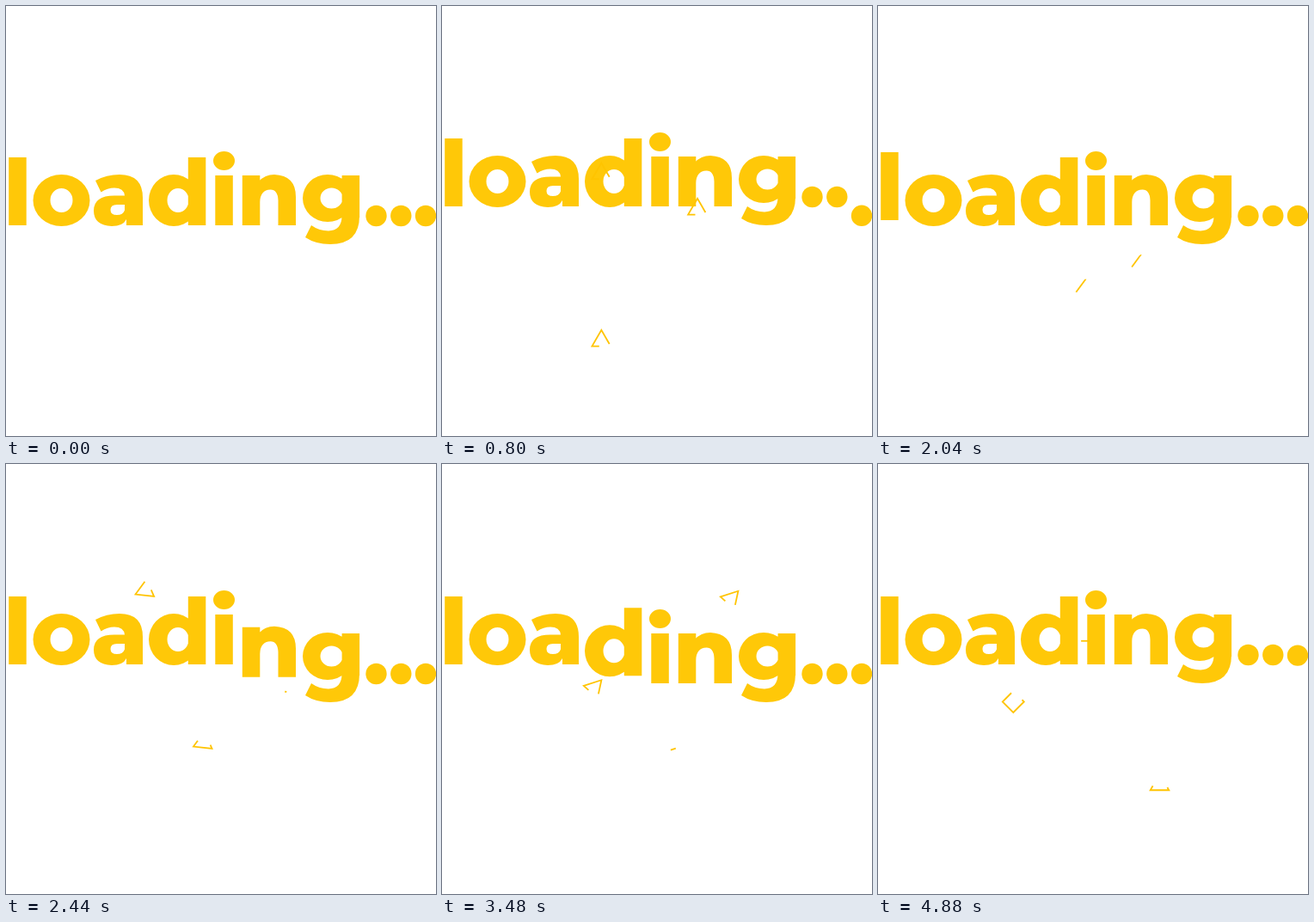
These frames come from a looping animation (500 by 500 pixels, 4.92 s). An HTML page:

```html
<!DOCTYPE html>
<html lang="en">
<head>
<meta charset="utf-8">
<title>loading...</title>
<style>
  html, body { margin: 0; width: 100%; height: 100%; overflow: hidden; background: #fff; }
  svg { display: block; width: 100%; height: 100%; }
  #word { fill: #ffc808; }
  #sparks { fill: none; stroke: #ffc400; stroke-width: 1.8; }
</style>
</head>
<body>
<svg viewBox="0 0 500 500" role="img" aria-label="loading...">
  <g id="word"></g>
  <g id="sparks"></g>
</svg>
<script>
const LOOP = 4920;
const SWEEP = 960, DELAY = 18, LIFT = 22, STEEP = 1.25;
const LIFE = 640, RADIUS = 12.5, TURNS = 2, TURN_TIME = 4800;

const clamp = v => Math.min(1, Math.max(0, v));
const smooth = v => v * v * (3 - 2 * v);

function add(parent, tag, attrs) {
  const el = document.createElementNS('http://www.w3.org/2000/svg', tag);
  for (const k in attrs) el.setAttribute(k, attrs[k]);
  return document.getElementById(parent).appendChild(el);
}

// Glyph parts: solid shapes run clockwise, holes the other way
const BASE = 255, STEM = 20.5;
const stem = (x, top, bottom = BASE) => `M${x},${top}h${STEM}V${bottom}h${-STEM}Z`;
const oval = (x, y, rx, ry, sweep = 1) =>
  `M${x - rx},${y}a${rx},${ry} 0 1 ${sweep} ${2 * rx},0a${rx},${ry} 0 1 ${sweep} ${-2 * rx},0Z`;
const hole = (x, y, rx, ry) => oval(x, y, rx, ry, 0);
const dot = x => oval(x, 244, 12.2, 12.2);

const letters = [
  stem(3.2, 176),
  oval(64.5, 226, 33, 30) + hole(64.5, 226, 13, 14),
  'M104,203Q117,196 132,196Q159,196 159,223V255H140V248Q136,256 123,256Q102,255 102,238' +
    'Q102,220.5 126,220.5H138Q137,211.5 126,211.5Q118,211.5 110.5,216.5Z' +
    'M138,231H129Q121.5,231 121.5,237Q121.5,243 129,243Q136,243 138,237.5Z',
  oval(195, 226, 29, 30) + hole(200, 226, 12.5, 14) + stem(211.8, 176),
  oval(253.5, 180, 12.5, 11) + stem(243.3, 197),
  stem(274.8, 197) + 'M294,204Q301,196 312,196Q337,197 337,222V255H316.5V226' +
    'Q316,213.5 307.5,213.5Q295.5,214 295.3,228H290Z',
  oval(374, 223.5, 29, 27.5) + hole(378.5, 223.5, 13, 12) + stem(390.6, 197, 246) +
    'M411,244Q411,277 377,277Q360,277 348,269L355,255Q364,261.5 375,261.5Q390.5,261 390.5,244Z',
  ...[430.5, 459.3, 488].map(dot)
].map(d => add('word', 'path', { d }));

// Where and when the little outlines appear: sides, birth, x, y
const sparks = [
  [3, 480, 185.3, 389.3], [3, 480, 297, 236.3], [3, 480, 185.3, 195],
  [3, 850, 250, 355], [4, 1070, 268, 175.5], [3, 1138, 104, 284],
  [3, 1473, 293.6, 295], [3, 1963, 229.4, 323.5], [3, 2150, 162, 146.5],
  [3, 2432, 320, 258], [4, 2600, 310, 124], [3, 2867, 275.5, 336],
  [3, 3090, 336, 157], [3, 3090, 177, 260.5], [4, 3500, 330, 343],
  [3, 3680, 382, 270.5], [4, 3808, 196.5, 331.5], [4, 4119, 199.5, 226],
  [4, 4560, 157.3, 276.5], [3, 4739, 327.5, 373], [3, 4839, 237, 199.5]
].map(([sides, birth, x, y]) => {
  const points = Array.from({ length: sides }, (_, i) => {
    const a = i * 2 * Math.PI / sides;
    return [RADIUS * Math.cos(a), RADIUS * Math.sin(a)];
  }).join(' ');
  return { el: add('sparks', 'polygon', { points, pathLength: 1 }), birth, x, y };
});

// Edge of the raised part of the word, in characters; it sweeps out and back
function edge(t) {
  const u = Math.max(0, t - DELAY) / SWEEP % 2;
  return letters.length * smooth(u < 1 ? u : 2 - u);
}

// All outlines share one rotation; each opens and closes along its path
function drawSpark({ el, birth, x, y }, t) {
  const u = (t - birth) / LIFE;
  const alive = u > 0 && u < 1;
  el.style.display = alive ? '' : 'none';
  if (!alive) return;
  const len = 0.75 * Math.sin(Math.PI * u);
  const angle = 360 * TURNS * clamp(t / TURN_TIME) - 90;
  el.setAttribute('transform', `translate(${x} ${y}) rotate(${angle})`);
  el.setAttribute('stroke-dasharray', `${len} 1`);
  el.setAttribute('stroke-dashoffset', 0.26 * len - 0.4);
}

function draw(t) {
  const e = edge(t);
  letters.forEach((el, i) => {
    const rise = clamp((e - i - 0.5) * STEEP + 0.5);
    el.setAttribute('transform', `translate(0 ${-LIFT * rise})`);
  });
  sparks.forEach(s => drawSpark(s, t));
}

const begin = performance.now();
function tick() {
  draw((performance.now() - begin) % LOOP);
  requestAnimationFrame(tick);
}
tick();
</script>
</body>
</html>
```
